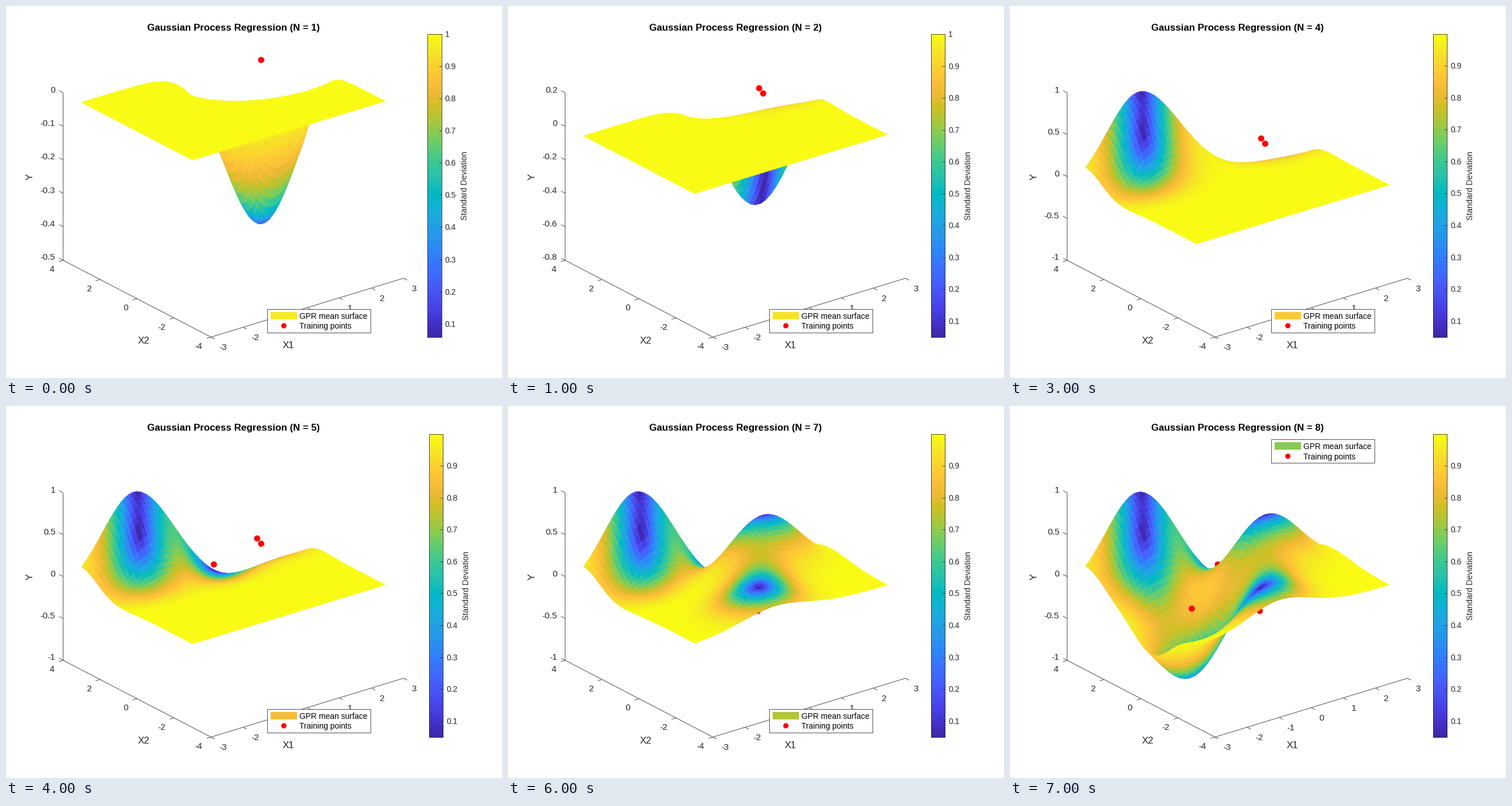
Recreate the animation shown at these times as a matplotlib script. Size 864 by 648 pixels, loop 8 s.

```python
import numpy as np
import matplotlib.pyplot as plt
from matplotlib.animation import FuncAnimation
from matplotlib.collections import PolyCollection
from matplotlib.colors import LinearSegmentedColormap
from matplotlib.patches import Rectangle

W, H = 864, 648
DARK = "#262626"
NOISE = 0.05

PARULA = LinearSegmentedColormap.from_list("parula", (
    "#3e26a8 #4332cb #4741e5 #4852f4 #4563fd #3875fe #2e87f7 #2797eb "
    "#20a5e3 #12b1d6 #02bac3 #24c1ae #37c897 #57cc7a #81cc59 #abc739 "
    "#d1bf27 #f0ba36 #fec338 #fad62d #f5e924 #f9fb15").split())

# Training inputs and observed values
TRAIN = np.array([
    (2.125, 2.184, -0.489), (2.243, 2.607, -0.674),
    (-1.42, 2.77, 0.921), (-1.76, 2.09, 0.54),
    (0.414, 1.772, -0.08), (0.835, -0.015, 0.741),
    (-0.52, -2.12, 0.26), (-1.768, -0.603, -0.808)])

SIDE = np.linspace(-3, 3, 50)
G1, G2 = np.meshgrid(SIDE, SIDE)
GRID = np.column_stack([G1.ravel(), G2.ravel()])

plt.rcParams["font.family"] = "Liberation Sans"
fig = plt.figure(figsize=(W / 72, H / 72), dpi=72, facecolor="white")
ax = fig.add_axes([0, 0, 1, 1])


def kernel(a, b):
    d2 = ((a[:, None, :] - b[None, :, :]) ** 2).sum(axis=2)
    return np.exp(-d2 / 2)


def predict(n):
    """Posterior mean and standard deviation on the grid."""
    pts, y = TRAIN[:n, :2], TRAIN[:n, 2]
    inv = np.linalg.inv(kernel(pts, pts) + NOISE ** 2 * np.eye(n))
    k = kernel(GRID, pts)
    var = 1 - np.einsum("ij,jk,ik->i", k, inv, k)
    shape = G1.shape
    return (k @ inv @ y).reshape(shape), np.sqrt(np.maximum(var, 0)).reshape(shape)


def project(x1, x2, z, zlim):
    u, v = (x1 + 3) / 6, (x2 + 4) / 8
    h = (z - zlim[0]) / (zlim[1] - zlim[0])
    return 357 + 335.5 * u - 257.5 * v, 576.7 - 102.5 * u - 133.7 * v - 291.8 * h


def nearness(x1, x2):
    return -0.527 * x1 / 6 - 0.687 * x2 / 8


def text(x, y, s, size, color=DARK, **kw):
    """Text whose capitals are centred on y."""
    ax.text(x, y + 0.36 * size, s, size=size, color=color, va="baseline", **kw)


def line(x, y, width=0.8):
    ax.plot(x, y, color=DARK, lw=width, solid_capstyle="butt")


def disc(x, y, r):
    t = np.linspace(0, 2 * np.pi, 24, endpoint=False)
    return np.column_stack([x + r * np.cos(t), y + r * np.sin(t)])


def draw_axes(zlim, step):
    corners = [(-3, 4, zlim[1]), (-3, 4, zlim[0]), (-3, -4, zlim[0]), (3, -4, zlim[0])]
    line(*zip(*[project(*c, zlim) for c in corners]))
    for v in range(-3, 4):
        x, y = project(v, -4, zlim[0], zlim)
        line([x, x + 6.5], [y, y + 3.4])
        text(x + 14, y + 17, str(v), 15.2)
    for v in range(-4, 5, 2):
        x, y = project(-3, v, zlim[0], zlim)
        line([x, x - 7.5], [y, y + 2.3])
        text(x - 15, y + 15, str(v), 15.2, ha="right")
    for v in np.arange(zlim[0], zlim[1] + step / 2, step):
        x, y = project(-3, 4, v, zlim)
        line([x, x - 7], [y, y - 3.7])
        text(86, y - 6, f"{round(v, 1) + 0.0:g}", 15.2, ha="right")
    text(492, 590, "X1", 16.8, ha="center")
    text(240, 582, "X2", 16.8, ha="center")
    ax.text(42, 297, "Y", size=16.8, color=DARK, rotation=90, ha="center", va="center")


def draw_surface(n, mean, std, norm, zlim):
    px, py = project(G1, G2, mean, zlim)
    p = np.stack([px, py], axis=-1)
    quads = np.stack([p[:-1, :-1], p[:-1, 1:], p[1:, 1:], p[1:, :-1]], axis=2)
    quads = quads.reshape(-1, 4, 2)
    half = (SIDE[1] - SIDE[0]) / 2
    depth = nearness(G1[:-1, :-1] + half, G2[:-1, :-1] + half).ravel()
    colors = PARULA(norm(std[:-1, :-1]).ravel())

    # Markers lie on the z = 0 plane and are sorted in among the faces
    a, b = TRAIN[:n, 0], TRAIN[:n, 1]
    dots = [disc(x, y, 4.9) for x, y in zip(*project(a, b, 0, zlim))]
    shapes = list(quads) + dots
    depth = np.append(depth, nearness(a, b))
    colors = np.vstack([colors, np.tile([1, 0, 0, 1], (n, 1))])
    order = np.argsort(depth, kind="stable")
    ax.add_collection(PolyCollection([shapes[i] for i in order],
                                     facecolors=colors[order],
                                     edgecolors=colors[order], linewidths=1))


def draw_colorbar(n, vmin, vmax):
    left = 734 if n == 1 else 736.5
    right, top, bottom = left + 24.5, 49, 576.7
    ramp = np.linspace(1, 0, 256)[:, None]
    ax.imshow(ramp, cmap=PARULA, extent=(left, right, bottom, top), aspect="auto",
              interpolation="nearest", vmin=0, vmax=1)
    ax.add_patch(Rectangle((left, top), right - left, bottom - top,
                           fill=False, ec=DARK, lw=0.8))
    for i in range(1, 11):
        v = i / 10
        if v > vmax:
            continue
        y = bottom - (v - vmin) / (vmax - vmin) * (bottom - top)
        line([right - 5, right], [y, y])
        text(right + 6.3, y, f"{v:g}", 13.9)
    ax.text(right + 40.5, 313, "Standard Deviation", size=14, color=DARK,
            rotation=90, ha="center", va="center")


def draw_legend(top, color):
    ax.add_patch(Rectangle((455, top), 180, 41, fc="white", ec=DARK, lw=0.8, zorder=5))
    ax.add_patch(Rectangle((461, top + 5), 46, 13, fc=color, ec="none", zorder=6))
    ax.add_collection(PolyCollection([disc(484, top + 29.5, 4.6)],
                                     facecolors="red", edgecolors="none", zorder=6))
    text(511.3, top + 12, "GPR mean surface", 13.9, "black", zorder=6)
    text(511.3, top + 29.7, "Training points", 13.9, "black", zorder=6)


def draw(i):
    n = i + 1
    ax.clear()
    ax.axis("off")
    zlim, step = {1: ((-0.5, 0), 0.1), 2: ((-0.8, 0.2), 0.2)}.get(n, ((-1, 1), 0.5))
    vmin = 0.059 if n == 1 else 0.0495
    vmax = 1 if n < 4 else 0.9995
    mean, std = predict(n)

    def norm(v):
        return np.clip((v - vmin) / (vmax - vmin), 0, 1)

    draw_axes(zlim, step)
    draw_surface(n, mean, std, norm, zlim)
    draw_colorbar(n, vmin, vmax)
    draw_legend(58 if n == 8 else 527.5, PARULA(norm(std.mean())))
    text(396.5, 36.5, f"Gaussian Process Regression (N = {n})", 16.85, "black",
         weight="bold", ha="center")
    ax.set_xlim(0, W)
    ax.set_ylim(H, 0)
    return []


anim = FuncAnimation(fig, draw, frames=len(TRAIN), init_func=lambda: [],
                     interval=1000, repeat=True, repeat_delay=0)
plt.show()
```
